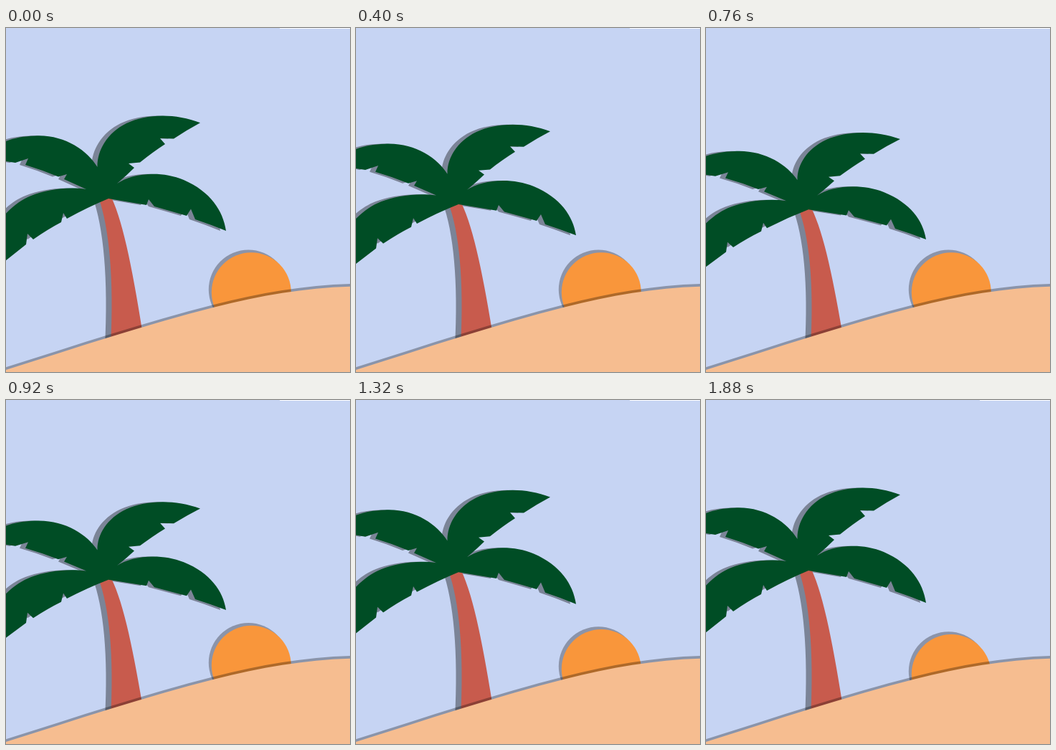
Animation of 480x480 px, one loop 1920 ms. Source, as an HTML page with a canvas:

```html
<!DOCTYPE html>
<html lang="en">
<head>
<meta charset="utf-8">
<title>Palm and sunset</title>
<style>
  html, body { margin: 0; width: 100%; height: 100%; overflow: hidden; background: #c6d4f3; }
  canvas { display: block; width: 480px; height: 480px; }
</style>
</head>
<body>
<canvas id="stage" width="480" height="480"></canvas>
<script>
const ctx = document.getElementById('stage').getContext('2d');
const LOOP = 1920, STEP = 40, GROUND = 450;
const SHADE = 'rgba(0,0,0,0.3)';

// Fronds, counter-clockwise from the tip of the upper right one
const fronds = new Path2D(`
  M271 132.3 C235 118 195 120 168 133 C140 147 127 172 127.5 194
  C113 170 80 148 40 150.5 C20 151 5 155 -12 163
  L-12 184 L13 188 L31 182 L27 191 Q50 198 73 207.5 L85 204 L81 211 L112 225
  C85 221 55 226 35 234 C18 241 5 252 -15 275
  L-15 336 L28 302 L30 287 L38 295 Q58 281 77 271 L80 258 L85 266 Q114 250 143 238
  L196 247 L199 239 L207 249 Q228 255 252 262 L258 252.5 L264 267 Q285 274 307 283
  C303 255 285 228 248 212 C215 198 175 203 155 217
  Q168 206 179 195 L171 189 L187 187.5 Q205 173 222 162 L215 154 L234 154.5
  Q253 142 271 132.3 Z`);

const trunk = new Path2D(
  'M129 236 C144 278 151 350 146 445 L193 440 C178 345 165 275 147 236 Z');

const sand = new Path2D(`
  M-6 479 L0 477 C97 446.5 194 414 291 389.5
  C354 373.75 417 362.4 480 360.8 L490 360.6 L490 500 L-6 500 Z`);

function fill(path, color, dx = 0, dy = 0) {
  ctx.save();
  ctx.translate(dx, dy);
  ctx.fillStyle = color;
  ctx.fill(path);
  ctx.restore();
}

function disc(x, y, r) {
  const p = new Path2D();
  p.arc(x, y, r, 0, Math.PI * 2);
  return p;
}

function drawSun(t) {
  const y = 368.8 + Math.max(0, t - 800) * 0.0128;
  const sun = disc(342.3, y, 55.5);
  fill(sun, '#8b94aa', -4, -3.8);
  fill(sun, '#f9963b');
}

function drawPalm(t) {
  // The crown sinks steadily, then springs back faster
  const drop = t < 800 ? t * 0.03 : Math.max(0, 24 - (t - 800) * 0.04);
  ctx.save();
  ctx.translate(0, GROUND);
  ctx.scale(1, 1 - drop / (GROUND - 132));
  ctx.translate(0, -GROUND);
  for (const part of [trunk, fronds]) fill(part, '#7b8497', -8);
  fill(trunk, '#c85b4d');
  fill(fronds, '#004d25');
  ctx.restore();
}

function draw(t) {
  ctx.fillStyle = '#c6d4f3';
  ctx.fillRect(0, 0, 480, 480);
  drawSun(t);
  drawPalm(t);
  fill(sand, SHADE, 0, -3.7);
  fill(sand, '#f6bd90');
  ctx.fillStyle = '#fff';
  ctx.fillRect(382, 0, 98, 1);
}

const start = performance.now();
function tick() {
  const t = (performance.now() - start) % LOOP;
  draw(Math.floor(t / STEP) * STEP);
  requestAnimationFrame(tick);
}
tick();
</script>
</body>
</html>
```
